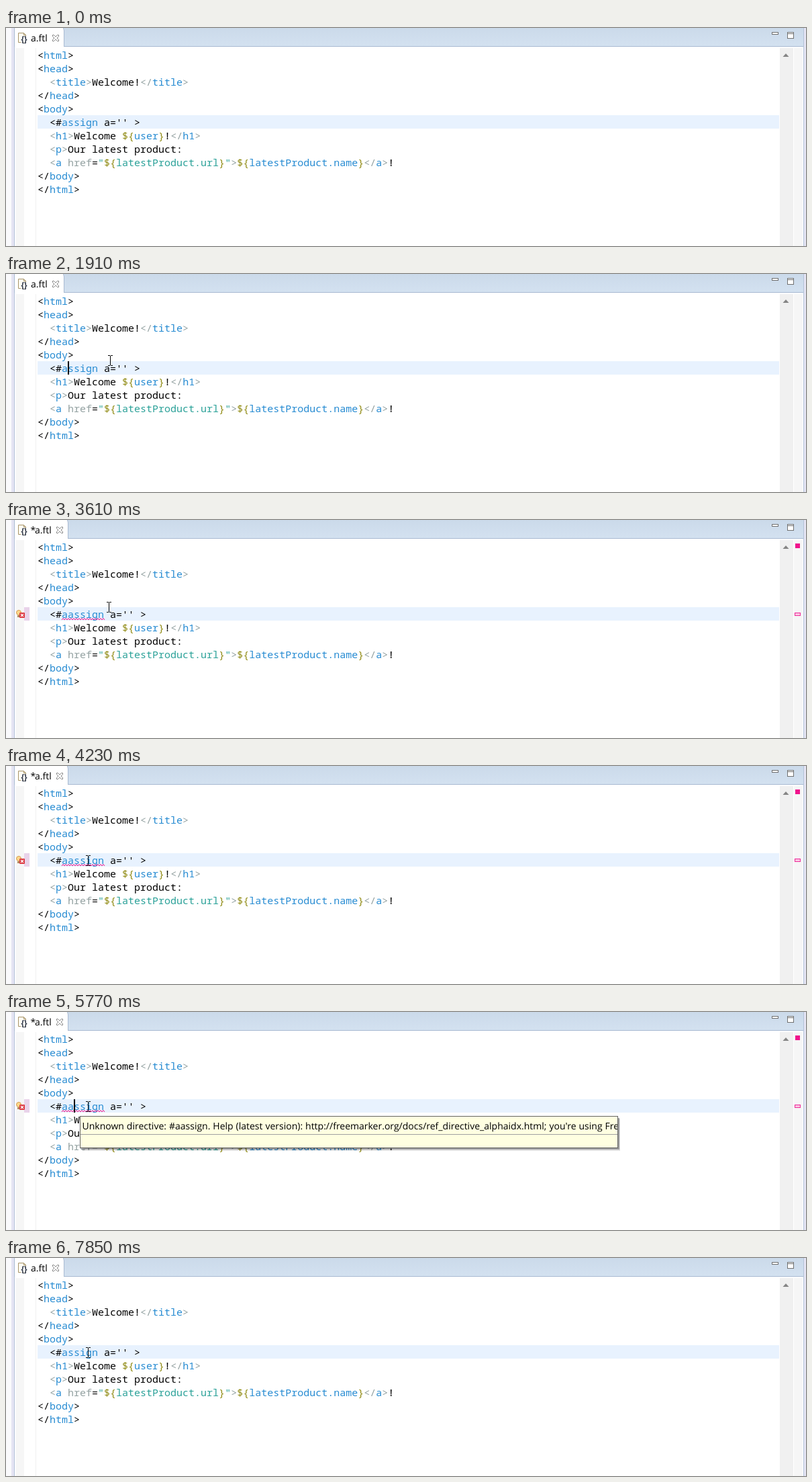
An HTML page that plays this animation: 1192x325 px, repeating every 8 s.

```html
<!DOCTYPE html>
<html lang="en">
<head>
<meta charset="utf-8">
<title>Template editor</title>
<style>
  html, body { margin: 0; width: 100%; height: 100%; overflow: hidden; background: #fff; }
  svg { display: block; width: 1192px; height: 325px; }
  text { white-space: pre; }
  .ui { font: 14px "Open Sans", "Noto Sans", sans-serif; text-rendering: geometricPrecision; }
  .code { font: 15px "Noto Sans Mono", monospace; }
  .crisp { shape-rendering: crispEdges; }
  .k { fill: #000; }
  .b { fill: #268bd2; }
  .g { fill: #93a1a1; }
  .o { fill: #8f8a12; }
  .t { fill: #2aa198; }
</style>
</head>
<body>
<svg viewBox="0 0 1192 325">
  <defs>
    <linearGradient id="bar" x2="0" y2="1">
      <stop stop-color="#cbdaea"/><stop offset="1" stop-color="#d3e1f0"/>
    </linearGradient>
    <clipPath id="tipClip"><rect x="111" y="156" width="800" height="46"/></clipPath>
  </defs>

  <g class="crisp">
    <rect width="1192" height="325" fill="#fafafc"/>
    <rect x="8" width="5" height="325" fill="#e4e4f3"/>
    <rect x="1188" width="4" height="325" fill="#e4e4f3"/>
    <rect x="12" width="1177" height="325" fill="#b4c3d9"/>
    <rect x="13" width="1175" height="325" fill="#fff"/>
    <rect x="13" width="1175" height="27" fill="url(#bar)"/>
    <rect x="13" y="27" width="1175" height="1" fill="#a9bad2"/>
    <rect x="15" y="30" width="12" height="295" fill="#f6f6f6"/>
    <rect x="44" y="30" width="1" height="295" fill="#f0f0f0"/>
    <rect x="1153" y="30" width="20" height="295" fill="#f0f0f0"/>
    <rect x="1174" y="30" width="13" height="295" fill="#f6f6f6"/>
    <rect x="47" y="130" width="1105" height="20" fill="#e8f2fe"/>
    <path d="M1141.5 6.5h9v3h-9zM1164.5 6.5h9v9h-9zM1165 8.5h8" fill="#fff" stroke="#707070"/>
  </g>
  <path d="M1157.5 43l4.5-5 4.5 5z" fill="#858585"/>

  <path id="tabShape" fill="#fff" stroke="#a9bad2"/>
  <path d="M18.5 7.5h8l3 3v11h-11z" fill="#fffdf2" stroke="#a89468"/>
  <path d="M26.5 7.5v3h3" fill="none" stroke="#a89468"/>
  <rect x="22" y="12" width="11" height="10" fill="#fff" opacity=".75"/>
  <text x="22.5" y="20.5" font-family="Open Sans, sans-serif" font-size="11.5" font-weight="700" fill="#303848">{}</text>
  <g id="tabTail">
    <text class="ui" x="37" y="20">a.ftl</text>
    <path d="M69.5 10.5h2l2.500 2.500 2.500-2.500h2v2l-2.500 2.500 2.500 2.500v2h-2l-2.500-2.500-2.500 2.500h-2v-2l2.500-2.500-2.500-2.500z"
      fill="#fff" stroke="#777" stroke-width=".9"/>
  </g>

  <g id="lines" class="code"></g>

  <g id="dirty">
    <text class="ui" x="36.5" y="20">*</text>
    <g class="crisp">
      <rect x="27" y="130" width="8" height="20" fill="#e9d3ea"/>
      <rect x="1176" y="35" width="7" height="7" fill="#f0148c"/>
      <rect x="1175.5" y="138.5" width="8" height="4" fill="#fbc4e2" stroke="#ee2c9a"/>
    </g>
    <circle cx="19" cy="138" r="3.5" fill="#fbd98c" stroke="#d89a50"/>
    <rect x="17" y="142" width="3" height="3" fill="#b58a60"/>
    <rect x="20" y="138" width="8" height="8" rx="1" fill="#dc3a42"/>
    <path d="M22 140l4 4m0-4l-4 4" stroke="#fff" stroke-width="1.2"/>
    <path id="squiggle" fill="none" stroke="#f0148c"/>
  </g>

  <rect id="caret" class="crisp" y="130" width="2" height="20"/>

  <g id="tip">
    <g class="crisp">
      <rect x="114" y="159" width="801" height="48" fill="#000" opacity=".12"/>
      <rect x="113" y="158" width="801" height="47" fill="#000" opacity=".3"/>
      <rect x="110.5" y="155.5" width="801" height="47" fill="#ffffe1" stroke="#646464"/>
      <rect x="111" y="182" width="800" height="1" fill="#a0a0a0"/>
    </g>
    <g clip-path="url(#tipClip)">
      <text class="ui" x="113.5" y="175" word-spacing=".3">Unknown directive: #aassign. Help (latest version): http://freemarker.org/docs/ref_directive_alphaidx.html; you're using FreeMarker</text>
    </g>
  </g>

  <g id="pointer" class="crisp">
    <rect y="-7" width="1" height="14"/>
    <path d="M-3-7.5h3m1 0h3M-3 7.5h3m1 0h3" stroke="#000"/>
  </g>
</svg>

<script>
const LOOP = 8000;
const STEP = 77;
const BLINK = 525;
const TYPED = 2670, TIP = 4460, CLICKED = 6160, UNDONE = 7390;

// Each run is a colour class letter followed by its text.
const LINES = [
  ["k<", "bhtml", "k>"],
  ["k<", "bhead", "k>"],
  ["g  <", "btitle", "g>", "kWelcome!", "g</", "btitle", "g>"],
  ["k</", "bhead", "k>"],
  ["k<", "bbody", "k>"],
  ["k  <#", "bassign", "k a='' >"],
  ["g  <", "bh1", "g>", "kWelcome ", "o${", "buser", "o}", "k!", "g</", "bh1", "g>"],
  ["g  <", "bp", "g>", "kOur latest product:"],
  ["g  <", "ba", "g href", "k=", "t\"", "o${", "tlatestProduct.url", "o}", "t\"", "g>",
    "o${", "blatestProduct.name", "o}", "g</", "ba", "g>", "k!"],
  ["k</", "bbody", "k>"],
  ["k</", "bhtml", "k>"]
];

const ENTRY = { start: 220, x: 469, y: 291 };
const MOVES = [
  { start: 300, end: 300, x: 387, y: 259 },
  { start: 530, end: 680, x: 160, y: 184 },
  { start: 830, end: 1290, x: 96, y: 146 },
  { start: 1520, end: 1680, x: 98, y: 145 },
  { start: 1830, end: 1980, x: 162, y: 127 },
  { start: 3540, end: 4070, x: 122, y: 141 }
];

// Every placement of the caret, by text column, restarts its blinking.
const CARETS = [
  { start: 1680, column: 5 },
  { start: TYPED, column: 6 },
  { start: CLICKED, column: 8 },
  { start: UNDONE, column: 5 }
];

const $ = id => document.getElementById(id);
const show = (id, on) => { $(id).style.display = on ? "" : "none"; };
const easeOut = p => 1 - (1 - p) ** 2;

function svg(tag, parent, attrs, content = "") {
  const node = document.createElementNS("http://www.w3.org/2000/svg", tag);
  for (const name in attrs) node.setAttribute(name, attrs[name]);
  node.textContent = content;
  return parent.appendChild(node);
}

LINES.forEach((runs, row) => {
  const line = svg("text", $("lines"), { x: 47, y: 46 + 20 * row });
  runs.forEach(run => svg("tspan", line, { class: run[0] }, run.slice(1)));
});
const directive = $("lines").children[5].children[1];
$("squiggle").setAttribute("d", "M83 149" + "l2-2.5 2 2.5".repeat(16));

function pointerAt(t) {
  let { x, y } = ENTRY;
  for (const move of MOVES.filter(m => m.start <= t)) {
    const steps = Math.round((move.end - move.start) / STEP) + 1;
    const done = Math.floor((t - move.start) / STEP) + 1;
    const p = easeOut(Math.min(done / steps, 1));
    x += (move.x - x) * p;
    y += (move.y - y) * p;
  }
  return `translate(${Math.round(x)} ${Math.round(y)})`;
}

function drawCaret(t) {
  const caret = CARETS.filter(c => c.start <= t).pop();
  const lit = caret && Math.floor((t - caret.start + 65) / BLINK) % 2 === 0;
  show("caret", lit);
  if (lit) $("caret").setAttribute("x", 47 + 9 * caret.column);
}

function draw(t) {
  const dirty = t >= TYPED && t < UNDONE;
  const shift = dirty ? 6 : 0;
  show("dirty", dirty);
  show("tip", t >= TIP && t < CLICKED);
  directive.textContent = dirty ? "aassign" : "assign";
  $("tabTail").setAttribute("transform", `translate(${shift})`);
  $("tabShape").setAttribute("d", `M12.5 28V-2H${82.5 + shift}q4 1 4 6V28`);
  drawCaret(t);
  show("pointer", t >= ENTRY.start);
  $("pointer").setAttribute("transform", pointerAt(t));
}

const start = performance.now();
function tick() {
  draw((performance.now() - start) % LOOP);
  requestAnimationFrame(tick);
}
tick();
</script>
</body>
</html>
```
